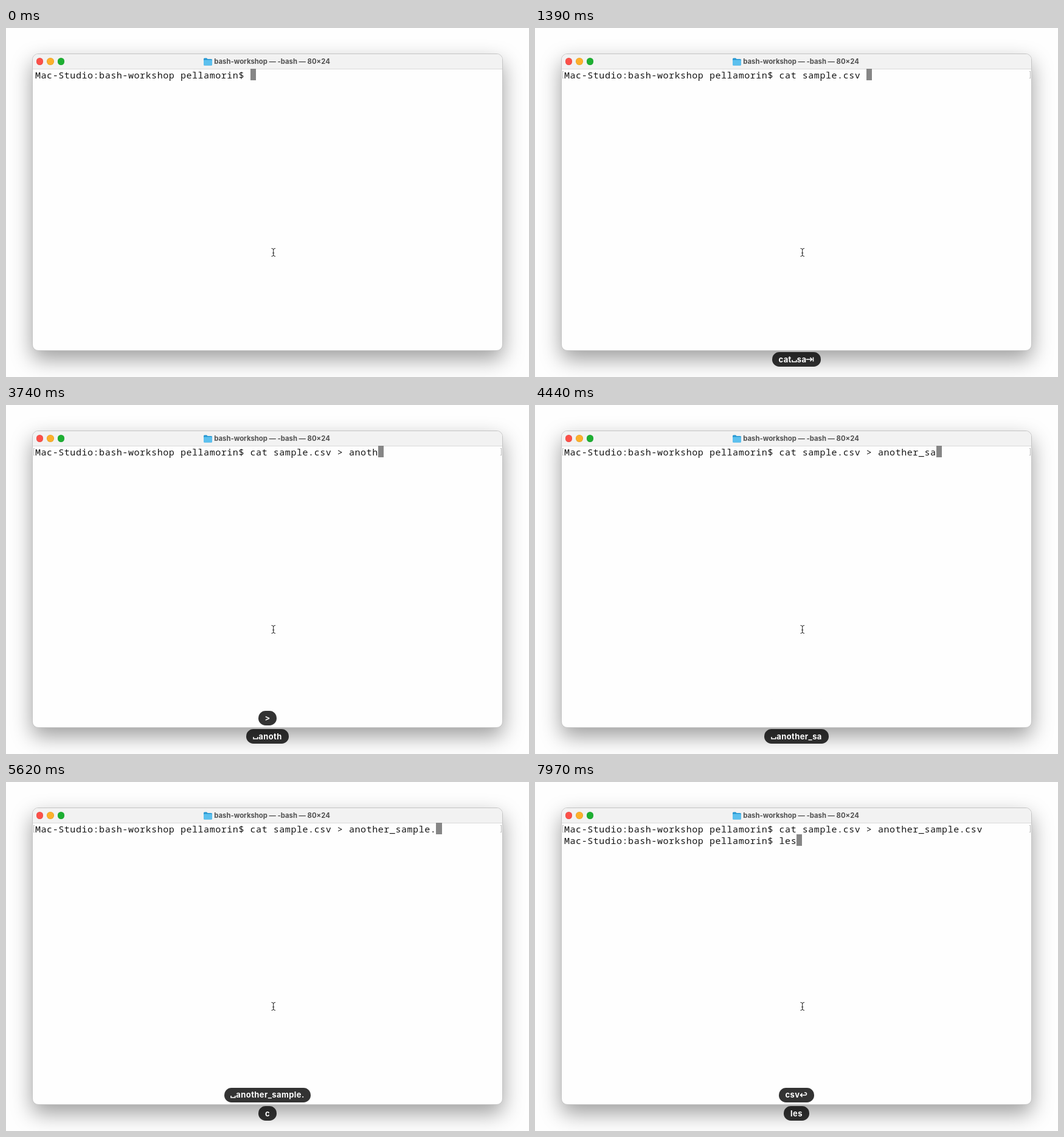
Write an HTML page that moves like this. It is 860 px wide and 574 px high and loops after 8 s.

```html
<!DOCTYPE html>
<html lang="en">
<head>
<meta charset="utf-8">
<title>Terminal</title>
<style>
html, body { margin: 0; width: 100%; height: 100%; overflow: hidden; background: #fefefe; }
#stage { position: relative; width: 860px; height: 574px; overflow: hidden; }
#stage > *, .bar > *, .mark { position: absolute; }
.window {
  left: 43px; top: 42px; width: 774px; height: 489px; border-radius: 10px; background: #fefefe;
  box-sizing: border-box; border: 1px solid #c4c4c4;
  box-shadow: 0 14px 34px rgba(0,0,0,.38);
}
.bar {
  left: 44px; top: 43px; width: 772px; height: 24px; border-radius: 9px 9px 0 0;
  background: #f2f2f2; border-bottom: 1px solid #dadada;
}
.dot {
  top: 6.300px; width: 11.400px; height: 11.400px; border-radius: 50%;
  box-shadow: inset 0 0 0 .6px rgba(0,0,0,.12);
}
.name {
  left: 298.300px; top: 0; white-space: pre;
  font: 700 11.3px/24px Inter, "Liberation Sans", sans-serif; color: #505050;
}
#term {
  left: 48px; top: 67.7px; margin: 0; color: #161616;
  font: 15px/19px "Noto Sans Mono", "DejaVu Sans Mono", monospace; letter-spacing: .555px;
}
#caret { width: 9.2px; height: 19px; background: #868686; }
.mark { top: 71px; width: 1px; height: 10px; border: 1px solid #bbb; }
#pills {
  left: 0; right: 0; bottom: 17.2px; display: flex; flex-direction: column;
  align-items: center; gap: 6.7px;
}
.pill {
  display: flex; align-items: center; justify-content: center; box-sizing: border-box;
  height: 23.6px; min-width: 29.5px; padding: 0 10.8px; border-radius: 11.8px;
  background: rgba(0,0,0,.8); color: #fff;
  font: 700 13px/23px Inter, "Liberation Sans", sans-serif; letter-spacing: .4px;
}
.pill svg { flex: none; fill: none; stroke: #fff; stroke-width: 1.6; }
</style>
</head>
<body>
<div id="stage">
  <div class="window"></div>
  <div class="bar">
    <div class="dot" style="left:6px;background:#fc5049"></div>
    <div class="dot" style="left:23.300px;background:#fcb02b"></div>
    <div class="dot" style="left:40.600px;background:#1db032"></div>
    <svg style="left:281px;top:5.500px" width="14" height="13">
      <path d="M0 2q0-1.500 1.500-1.500h3.500l1.500 1.500h6q1.500 0 1.500 1.500v7.500q0 1.500-1.500 1.500h-11q-1.500 0-1.500-1.500z" fill="#2596d1"/>
      <rect y="3.500" width="14" height="9" rx="1.200" fill="#5cc0ee"/>
    </svg>
    <div class="name">bash-workshop — -bash — 80×24</div>
  </div>
  <div id="marks">
    <div class="mark" style="left:44.5px;border-right:0"></div>
    <div class="mark" style="left:812.5px;border-left:0"></div>
  </div>
  <div id="caret"></div>
  <pre id="term"></pre>
  <svg style="left:435px;top:361px" width="10" height="16" fill="none" stroke="#222" stroke-width="1">
    <path d="M1.500 1.500Q4.700 1.500 4.700 3.500Q4.700 1.500 8 1.500M4.700 3v10M1.500 14.500Q4.700 14.500 4.700 12.500Q4.700 14.500 8 14.500M3.200 9h3"/>
  </svg>
  <div id="pills"></div>
</div>
<script>
const LOOP = 8000, GAP = 550, HOLD = 2000, CELL = 9.555, LINE = 19;
const PROMPT = "Mac-Studio:bash-workshop pellamorin$ ";
const TAB = "⇥", ENTER = "↩", SPACE = "␣", TAB_TIME = 1390;

// time, key, delay until the terminal echoes it
const keys = [
  [500, "c"], [560, "a", 60], [620, "t"], [860, SPACE], [1030, "s"], [1160, "a"], [TAB_TIME, TAB],
  [2150, ">"], [2860, SPACE],
  ...[..."another"].map((k, i) => [3330 + i * 96, k]),
  [4090, "_"], [4330, "s"], [4440, "a"], [4500, "m"], [4570, "p"], [4680, "l"], [4800, "e"], [4970, "."],
  [5620, "c", 60], [5740, "s"], [5910, "v"], [6210, ENTER, 60],
  [7800, "l"], [7880, "e"], [7970, "s"]
];
const echo = { [TAB]: "mple.csv ", [ENTER]: "\n" + PROMPT, [SPACE]: " " };

const icon = (w, d) => `<svg width="${w}" height="14"><path d="${d}"/></svg>`;
const icons = {
  [SPACE]: icon(9, "M1 8v3h6.800v-3"),
  [TAB]: icon(13, "M0 7h9M6.500 4l3 3l-3 3M11.500 3.500v7"),
  [ENTER]: icon(13, "M4.500 4l-3 3l3 3M2 7h7.500q2 0 2-2t-2-2h-1.500"),
  ">": "&gt;"
};

// keys pressed close together share a pill
const groups = [];
keys.forEach((key, i) => {
  if (!i || key[0] - keys[i - 1][0] > GAP) groups.push([]);
  groups.at(-1).push(key);
});

const $ = id => document.getElementById(id);
let shown = "";

function draw(t) {
  const text = PROMPT + keys.filter(([at, , lag = 0]) => at + lag <= t).map(([, k]) => echo[k] ?? k).join("");
  const pills = groups
    .map(g => g.filter(([at]) => at <= t))
    .filter(g => g.length && t < g.at(-1)[0] + HOLD)
    .map(g => `<div class="pill">${g.map(([, k]) => icons[k] ?? `<span>${k}</span>`).join("")}</div>`)
    .join("");
  if (shown === text + pills) return;
  shown = text + pills;

  const lines = text.split("\n");
  $("term").textContent = text;
  $("caret").style.left = 48.1 + lines.at(-1).length * CELL + "px";
  $("caret").style.top = 67 + (lines.length - 1) * LINE + "px";
  $("marks").style.display = t < TAB_TIME ? "none" : "";
  $("pills").innerHTML = pills;
}

const start = performance.now();
function tick() {
  draw((performance.now() - start) % LOOP);
  requestAnimationFrame(tick);
}
tick();
</script>
</body>
</html>
```
